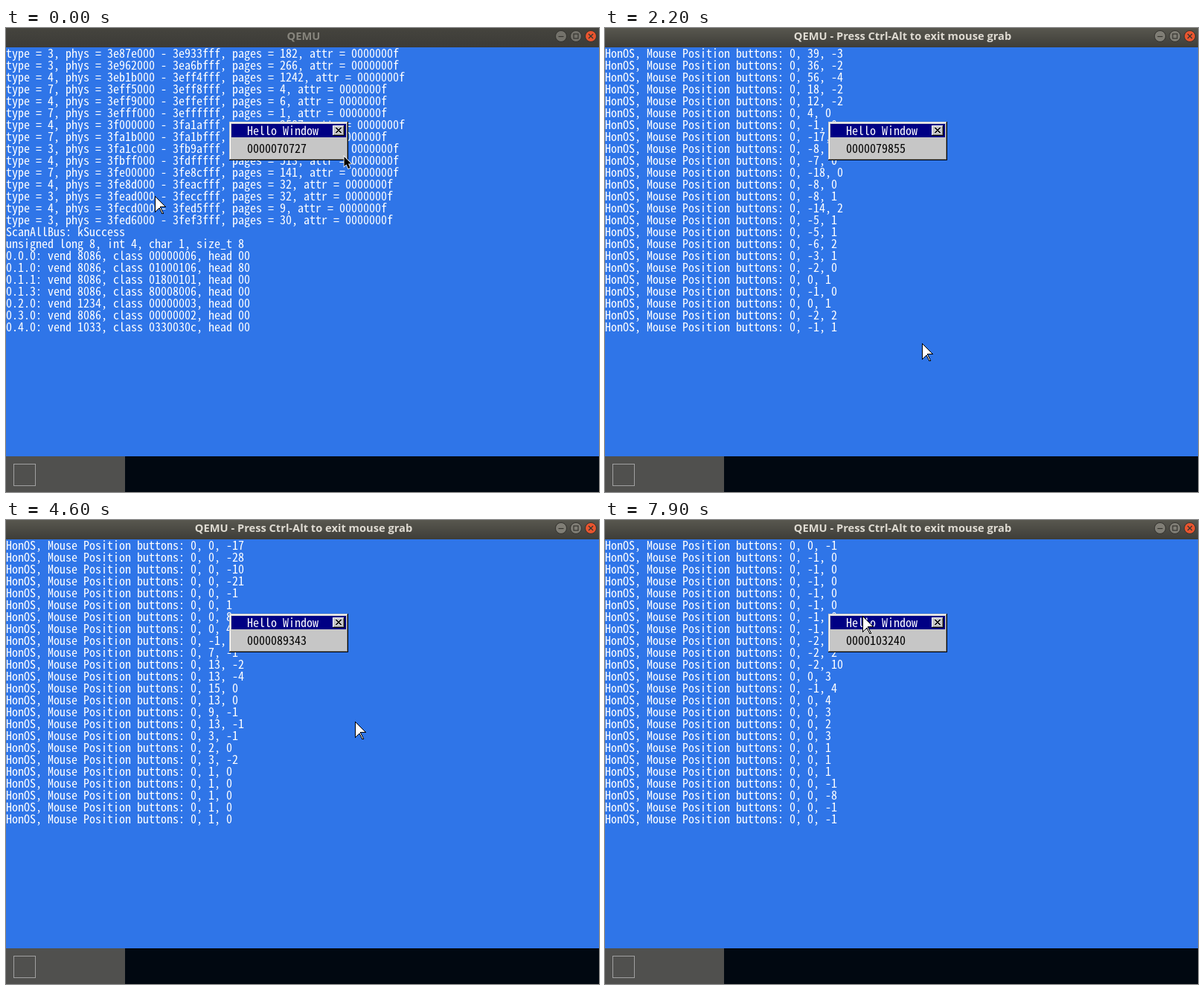
Write an HTML page with a canvas that moves like this. It is 797 px wide and 624 px high and loops after 8000 ms.

```html
<!DOCTYPE html>
<html lang="en">
<head>
<meta charset="utf-8">
<title>QEMU</title>
<style>
  html, body { margin: 0; width: 100%; height: 100%; overflow: hidden; background: #2f75e8; }
  canvas { display: block; }
</style>
</head>
<body>
<canvas id="stage" width="797" height="624"></canvas>
<script>
const LOOP = 8000, TICK = 100, GRAB = 400;
const ROWS = 24, CELL = 8, LINE = 16, TOP = 26;
const ctx = document.getElementById('stage').getContext('2d');

// Fit the console font to its 8 px cell.
const MONO = "px 'Noto Sans Mono CJK JP', 'Liberation Mono', monospace";
ctx.font = 16 + MONO;
const consoleFont = Math.min(16, 16 * CELL / ctx.measureText('0').width) + MONO;

// ---- console log and pointer, both driven by the same mouse events ----
const memory = `3 3e87e 3e933|3 3e962 3ea6b|4 3eb1b 3eff4|7 3eff5 3eff8|4 3eff9 3effe
|7 3efff 3efff|4 3f000 3fa1a|7 3fa1b 3fa1b|3 3fa1c 3fb9a|4 3fbff 3fdff|7 3fe00 3fe8c
|4 3fe8d 3feac|3 3fead 3fecc|4 3fecd 3fed5|3 3fed6 3fef3`;
const devices = `0.0.0 8086 00000006 00|0.1.0 8086 01000106 80|0.1.1 8086 01800101 00
|0.1.3 8086 80008006 00|0.2.0 1234 00000003 00|0.3.0 8086 00000002 00|0.4.0 1033 0330030c 00`;
const records = s => s.split('|').map(r => r.trim().split(' '));

const log = [
  ...records(memory).map(([type, from, to]) => {
    const pages = parseInt(to, 16) - parseInt(from, 16) + 1;
    return `type = ${type}, phys = ${from}000 - ${to}fff, pages = ${pages}, attr = 0000000f`;
  }),
  'ScanAllBus: kSuccess',
  'unsigned long 8, int 4, char 1, size_t 8',
  ...records(devices).map(([bus, vend, cls, head]) =>
    `${bus}: vend ${vend}, class ${cls}, head ${head}`)
].map(text => ({ at: 0, text, x: 200, y: 226 }));

let px = 200, py = 226;

function emit(at, button, dx, dy) {
  px += dx;
  py += dy;
  log.push({ at, text: `HonOS, Mouse Position buttons: ${button}, ${dx}, ${dy}`, x: px, y: py });
}

// Tokens: "dy" or "dx:dy", optionally "*count".
function burst(t0, t1, tokens) {
  const steps = tokens.split(' ').flatMap(token => {
    const [move, count = 1] = token.split('*');
    const pair = move.includes(':') ? move.split(':') : [0, move];
    return Array(+count).fill(pair.map(Number));
  });
  steps.forEach(([dx, dy], i) => emit(t0 + (t1 - t0) * (i + 1) / steps.length, 0, dx, dy));
}

// Eased move to a point in n whole-pixel steps.
function glide(t0, t1, n, x, y) {
  const sx = px, sy = py;
  for (let i = 1; i <= n; i++) {
    const k = (1 - Math.cos(Math.PI * i / n)) / 2;
    emit(t0 + (t1 - t0) * i / n, 0,
      Math.round(sx + (x - sx) * k) - px, Math.round(sy + (y - sy) * k) - py);
  }
}

function clicks(t0, t1, n) {
  for (let i = 0; i < 2 * n; i++) emit(t0 + (t1 - t0) * i / (2 * n - 1), 1 - i % 2, 0, 0);
}

burst(500, 1400, '1 1 7 13 30 1:13 6:35 6 3 1 5:1 28:9 41:10 18:4 24:5 47:9');
glide(1400, 1500, 4, 440, 412);
glide(1500, 1600, 4, 367, 434);
burst(1600, 2200, '39:-3 36:-2 56:-4 18:-2 12:-2 4:0 -1:0 -17:-5 -8:-5 -7:0 -18:0 -8:0 ' +
  '-8:1 -14:2 -5:1 -5:1 -6:2 -3:1 -2:0 1 -1:0 1 -2:2 -1:1');
glide(2200, 2300, 3, 420, 434);
glide(2300, 2500, 7, 104, 340);
glide(2500, 2700, 7, 372, 260);
burst(2700, 3400, '-1:18 20 20 18 13 14 15 15 15 13 1:3 1:2 ' +
  '-1 -8 -10 -17 1:-15 -13 -17 -17 -28 -10 -21 -1');
burst(3400, 4500, '1 8 4 -1:2 7:-1 13:-2 13:-4 15:0 13:0 9:-1 13:-1 3:-1 2:0 3:-2 1:0*5');
glide(4600, 5000, 9, 411, 240);
burst(5000, 5400, '-1:9 -1:3 -1:4 7 2 2 1 1');
clicks(5480, 6580, 8);
glide(6700, 7200, 14, 360, 101);
burst(7200, 7900, '-1 -1:0*6 -1:2 -2:4 -2:2 -2:10 3 -1:4 4 3 2 3 1 1 1 -1 -8 -1 -1');

// The counter runs slower while the console scrolls.
const counts = [[0, 70727], [1400, 77100], [2200, 79855], [3400, 83900],
  [4600, 89343], [6600, 97853], [7900, 103240]];

function countAt(t) {
  const i = Math.max(1, counts.findIndex(([at]) => at >= t));
  const [[t0, a], [t1, b]] = [counts[i - 1], counts[i]];
  return Math.round(a + (b - a) * (t - t0) / (t1 - t0));
}

// ---- drawing ----
function rect(color, x, y, w, h) {
  ctx.fillStyle = color;
  ctx.fillRect(x, y, w, h);
}

function print(text, x, top, color) {
  ctx.font = consoleFont;
  ctx.textAlign = 'center';
  ctx.fillStyle = color;
  [...text].forEach((ch, i) => {
    if (ch !== ' ') ctx.fillText(ch, x + i * CELL + CELL / 2, top + 14);
  });
}

function line(...points) {
  ctx.beginPath();
  points.forEach(([x, y]) => ctx.lineTo(x, y));
  ctx.stroke();
}

function titleBar(active) {
  const shade = ctx.createLinearGradient(0, 0, 0, TOP);
  shade.addColorStop(0, active ? '#58574f' : '#45443e');
  shade.addColorStop(1, active ? '#3e3d38' : '#3c3b37');
  rect(shade, 0, 0, 797, TOP);
  ctx.font = "bold 14.67px 'Open Sans', 'Noto Sans', sans-serif";
  ctx.textAlign = 'center';
  ctx.fillStyle = active ? '#dfdbd2' : '#87857d';
  ctx.fillText(active ? 'QEMU - Press Ctrl-Alt to exit mouse grab' : 'QEMU', 400, 16);

  [746, 766, 786].forEach((x, i) => {
    ctx.beginPath();
    ctx.arc(x, 11, 7.5, 0, 2 * Math.PI);
    ctx.fillStyle = i === 2 ? '#e9552f' : active ? '#807e76' : '#74726b';
    ctx.fill();
    ctx.strokeStyle = '#33322e';
    ctx.lineWidth = 1;
    ctx.stroke();
  });
  ctx.strokeStyle = '#35342f';
  ctx.lineWidth = 1.2;
  line([742.5, 11.5], [749.5, 11.5]);
  ctx.strokeRect(763, 8, 6, 6);
  line([783, 8], [789, 14]);
  line([789, 8], [783, 14]);
}

function taskBar() {
  rect('#010811', 0, 576, 797, 48);
  rect('#50504e', 0, 576, 160, 48);
  ctx.strokeStyle = '#a0a0a0';
  ctx.lineWidth = 1;
  ctx.strokeRect(10.5, 586.5, 29, 29);
}

function closeButton(x, y) {
  rect('#000', x, y, 16, 14);
  rect('#fff', x, y, 15, 13);
  rect('#848484', x + 1, y + 1, 14, 12);
  rect('#c6c6c6', x + 1, y + 1, 13, 11);
  for (let i = 0; i < 7; i++) {
    rect('#000', x + 4 + i, y + 3 + i, 2, 1);
    rect('#000', x + 10 - i, y + 3 + i, 2, 1);
  }
}

function helloWindow(count) {
  const x = 300, y = 126, w = 160, h = 52;
  rect('#000', x, y, w, h);
  rect('#c6c6c6', x, y, w - 1, h - 1);
  rect('#848484', x + 1, y + 1, w - 2, h - 2);
  rect('#fff', x + 1, y + 1, w - 3, h - 3);
  rect('#c6c6c6', x + 2, y + 2, w - 4, h - 4);
  rect('#000084', x + 3, y + 3, w - 6, 18);
  print('Hello Window', x + 24, y + 4, '#fff');
  closeButton(x + w - 21, y + 5);
  print(String(count).padStart(10, '0'), x + 24, y + 28, '#000');
}

function pointer(x, y) {
  const span = (dx, row, w) => {
    rect('#000', x + dx, y + row, w, 1);
    if (w > 2) rect('#fff', x + dx + 1, y + row, w - 2, 1);
  };
  for (let row = 0; row < 14; row++) span(0, row, row + 1);
  rect('#000', x + 8, y + 14, 7, 1);
  span(0, 14, 8);
  span(0, 15, 8);
  for (let row = 16; row < 24; row++) {
    if (row < 22) span(0, row, 22 - row);
    span(6 + Math.floor((row - 16) / 2), row, 3);
  }
  rect('#000', x + 9, y + 23, 3, 1);
}

function hostPointer(x, y) {
  ctx.beginPath();
  [[0, 0], [0, 13], [3, 10.5], [5.5, 16], [8, 15], [5.5, 9.5], [9.5, 9.5]]
    .forEach(([dx, dy]) => ctx.lineTo(x + dx, y + dy));
  ctx.closePath();
  ctx.lineWidth = 1.6;
  ctx.strokeStyle = '#fff';
  ctx.stroke();
  ctx.fillStyle = '#000';
  ctx.fill();
}

function draw(t) {
  const seen = log.filter(entry => entry.at <= t);
  const last = seen[seen.length - 1];
  rect('#2f75e8', 0, TOP, 797, 550);
  seen.slice(-ROWS).forEach((entry, i) => print(entry.text, 0, TOP + i * LINE, '#fff'));
  taskBar();
  helloWindow(countAt(t));
  pointer(last.x, last.y);
  titleBar(t >= GRAB);
  if (t < GRAB) hostPointer(454.5, 173);
}

let shown = -1;
const start = performance.now();

function frame() {
  const t = (performance.now() - start) % LOOP;
  const tick = Math.floor(t / TICK) * TICK;
  if (tick !== shown) draw(shown = tick);
  requestAnimationFrame(frame);
}
frame();
</script>
</body>
</html>
```
